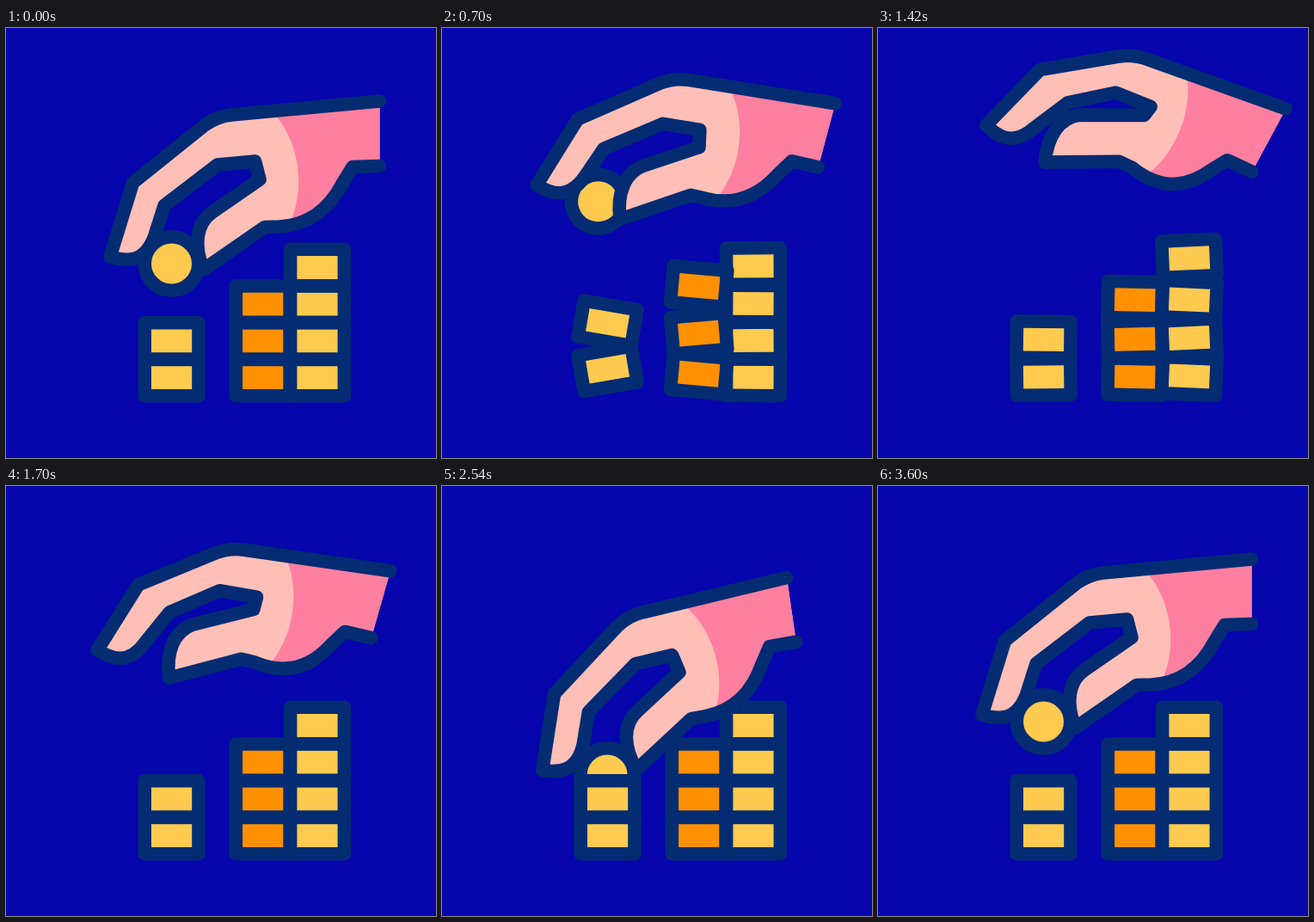
Animation of 500 by 500 pixels, one loop 3.62 s. Source, as an HTML page:

```html
<!DOCTYPE html>
<html lang="en">
<head>
<meta charset="utf-8">
<title>Hand and coins</title>
<style>
html, body { margin: 0; width: 100%; height: 100%; overflow: hidden; background: #0705ac; }
svg { display: block; width: 100vw; height: 100vh; }
.line { stroke: #032c72; stroke-width: 15.6; stroke-linecap: round; stroke-linejoin: round; }
</style>
</head>
<body>
<svg viewBox="0 0 500 500">
  <circle id="coin" class="line" r="31.3" fill="#feca4f"/>
  <g id="blocks"></g>
  <g id="hand">
    <path id="skin" fill="#ffbfb7"/>
    <path id="cuff" fill="#ff7fa0"/>
    <path id="outline" class="line" fill="none"/>
  </g>
</svg>
<script>
const LOOP = 3620;
const $ = id => document.getElementById(id);

const clamp = (t, from, to) => Math.min(1, Math.max(0, (t - from) / (to - from)));
const smooth = (t, from, to) => {
  const u = clamp(t, from, to);
  return u * u * (3 - 2 * u);
};
const sineOut = (t, from, to) => Math.sin(clamp(t, from, to) * Math.PI / 2);
const mix = (a, b, u) => a.map((v, i) => v + (b[i] - v) * u);

// Wrist x, wrist y and angle of the three poses.
const WRIST = [434, 140];
const REST = [...WRIST, 0];
const HIGH = [451, 141.5, 28.5];
const LOW = [393.5, 173.2, -13];

const HELD = [192.5, 274];   // coin between the fingertips
const PALMED = [242.5, 178]; // coin inside the closed hand
const STACKED = [192, 372];  // coin behind the left column

// The path moved by (dx, dy), in absolute commands of x y pairs.
function shift(path, dx, dy) {
  let n = 0;
  return path.replace(/[\d.]+/g, v => (+v + (n++ % 2 ? dy : dx)).toFixed(2));
}

// Each part of the outline slides a little when the hand flattens.
function handPaths(flat) {
  const part = (path, dx, dy) => shift(path, dx * flat, dy * flat);
  const wrist = part('C355 229 378 206 391 181L403 161.5L434.5 160.5', -2, 8);
  const outline = 'M434.5 85'
    + part('L262 101Q245 103 231 113', 3, 6)
    + part('L147.5 180L121 266C138 271 160 275 172.4 243', 12, -6)
    + part('L184 206.5', 22, -13)
    + part('L246 159L289.5 155', 4, -1)
    + part('L295 176', -4, -10)
    + part('L240 214C221 227 218 253 229.5 281', -17, -14)
    + part('L301 231.5L318 231', -12, -4)
    + wrist;
  const cuff = 'M313 101' + part('C338 130 350 180 331 225', -4, -2)
    + part('L355 229', -10, 2) + wrist + 'L434.5 85Z';
  return { outline, cuff };
}

// Columns of two, three and four blocks; the right one is painted first.
const blocks = [];
[192.6, 298.7, 362].map((x, i) => ({
  x,
  count: i + 2,
  start: 240 + 200 * i,
  unit: 1.27 - .2 * (i + 1),
  hop: i ? 1.5 : 0,
  fill: i === 1 ? '#ff9100' : '#feca4f'
})).reverse().forEach(col => {
  for (let row = 0; row < col.count; row++) {
    const el = document.createElementNS('http://www.w3.org/2000/svg', 'rect');
    const attrs = { class: 'line', x: -31.4, y: -21.2, width: 62.8, height: 42.4, fill: col.fill };
    for (const name in attrs) el.setAttribute(name, attrs[name]);
    $('blocks').append(el);
    const top = row === col.count - 1;
    blocks.push({
      el, col,
      y: 406.6 - row * 42.7,
      lift: col.unit * (row + 1) + (top ? col.hop : 0),
      sign: (row % 2 ? -1 : 1) * (col.count > 2 ? 1 : -1)
    });
  }
});

function drawBlocks(t) {
  for (const { el, col, y, lift, sign } of blocks) {
    const peak = col.start + 520;
    const tilt = 10 * smooth(t, col.start, peak) * (1 - smooth(t, peak, 1550));
    el.setAttribute('transform',
      `translate(${col.x} ${y - lift * tilt}) rotate(${sign * tilt})`);
  }
}

function drawHandAndCoin(t) {
  const drop = smooth(t, 1300, 2350);
  const back = sineOut(t, 2350, 3150);
  let pose = mix(REST, HIGH, smooth(t, 118, 1258));
  pose = mix(pose, LOW, drop);
  pose = mix(pose, REST, back);
  const [x, y, angle] = pose;
  const place = `translate(${x} ${y}) rotate(${angle}) translate(${-WRIST[0]} ${-WRIST[1]})`;

  const { outline, cuff } = handPaths(smooth(t, 580, 1060) * (1 - drop));
  $('outline').setAttribute('d', outline);
  $('skin').setAttribute('d', outline + 'Z');
  $('cuff').setAttribute('d', cuff);
  $('hand').setAttribute('transform', place);

  const rising = t < 1200;
  const [cx, cy] = rising ? mix(HELD, PALMED, smooth(t, 620, 1060)) : mix(STACKED, HELD, back);
  const coin = $('coin');
  coin.setAttribute('cx', cx);
  coin.setAttribute('cy', cy);
  coin.setAttribute('transform', rising ? place : '');
  coin.setAttribute('visibility', rising || back > 0 ? 'visible' : 'hidden');
}

function draw(now) {
  const t = now % LOOP;
  drawHandAndCoin(t);
  drawBlocks(t);
}

function tick(now) {
  draw(now);
  requestAnimationFrame(tick);
}
draw(0);
requestAnimationFrame(tick);
</script>
</body>
</html>
```
